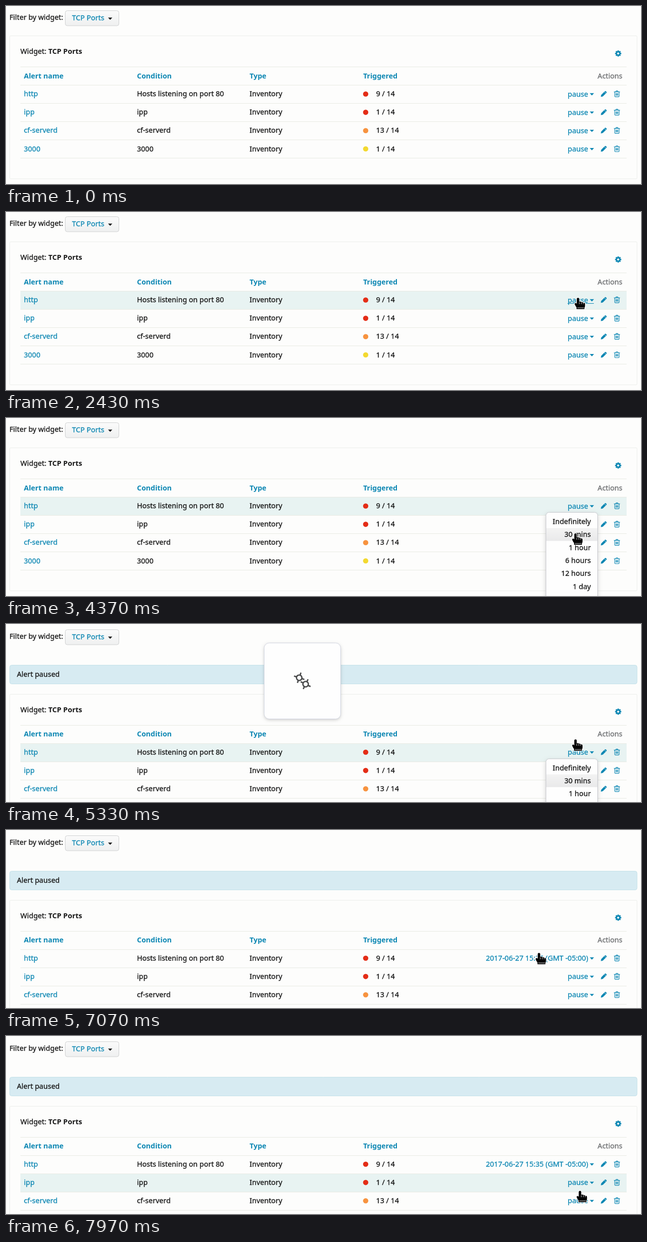
An HTML page with a canvas for the animation above (8 s loop, 1280x361 px).

```html
<!DOCTYPE html>
<html lang="en">
<head>
<meta charset="utf-8">
<title>Alert widget</title>
<style>
html, body { margin: 0; width: 100%; height: 100%; overflow: hidden; background: #fdfdfc; }
canvas { display: block; width: 1280px; height: 361px; }
</style>
</head>
<body>
<canvas id="stage" width="1280" height="361"></canvas>
<script>
const ctx = document.getElementById('stage').getContext('2d');
const LOOP = 8000;
const FONT = '"Noto Sans", "Open Sans", sans-serif';
const PAGE = '#fdfdfc', LINK = '#0d87b3', INK = '#161616', LINE = '#e8eae3';
const ROW_H = 37.1;

const ROWS = [
  ['http', 'Hosts listening on port 80', '9 / 14', '#e42d17'],
  ['ipp', 'ipp', '1 / 14', '#e42d17'],
  ['cf-serverd', 'cf-serverd', '13 / 14', '#f7933f'],
  ['3000', '3000', '1 / 14', '#f3d930']
];
const DELAYS = ['Indefinitely', '30 mins', '1 hour', '6 hours', '12 hours', '1 day'];

// Times of the hard state changes, in ms
const T = {
  rowIn: 2060, linkIn: 2150, menu: 2700, linkOut: 2950, load: 4970,
  paused: 5130, leave: 5860, reload: 6950, dateIn: 7130, dateOut: 7620, nextRow: 7810
};

// Pointer tip: time, x, y
const PATH = [
  [1640, 1120, -30], [2200, 1153, 174], [2800, 1153, 174], [3300, 1149, 248],
  [3700, 1148, 321], [3900, 1148, 321], [4130, 1148, 261], [4340, 1148, 234],
  [5800, 1148, 234], [6000, 1138, 233], [6750, 1138, 233], [7300, 1036, 259],
  [7500, 1035, 264], [7730, 1032, 311], [7970, 1157, 314]
];

const HAND = new Path2D('M-2.5 2.5Q-2.5 0 0 0Q2.5 0 2.5 2.5V8Q4.8 6.9 6.8 8.6Q9.2 7.9 10.8 10' +
  'Q14.2 9.6 14.2 13V16.5Q14.2 18.5 13 20V23H-3V19.5Q-5 17 -6.4 13.8Q-7.6 11.2 -5 10.4Q-3.5 10.2 -2.5 12Z');
const PENCIL = new Path2D('M-6 6L-5.2 2L2 -5.2Q3.2 -6.3 4.4 -5.2L5.4 -4.2Q6.3 -3 5.3 -2L-2 5.2Z');
const TRASH = new Path2D('M-6 -4H6M-2.3 -4.2L-1.5 -6H1.5L2.3 -4.2' +
  'M-4.4 -4V4.6Q-4.4 6 -3 6H3Q4.4 6 4.4 4.6V-4M-1.9 -1.4V3.6M0 -1.4V3.6M1.9 -1.4V3.6');

const within = (t, a, b) => t >= a && t < b;

// Regular text gets a hairline outline for a medium weight
function text(str, x, y, { color = INK, weight = 400, size = 14.5, align = 'left' } = {}) {
  ctx.font = `${weight} ${size}px ${FONT}`;
  ctx.textAlign = align;
  ctx.fillStyle = ctx.strokeStyle = color;
  ctx.fillText(str, x, y);
  if (weight === 400) {
    ctx.lineWidth = 0.3;
    ctx.strokeText(str, x, y);
  }
  return ctx.measureText(str).width;
}

function rect(x, y, w, h, color) {
  ctx.fillStyle = color;
  ctx.fillRect(x, y, w, h);
}

function box(x, y, w, h, r, fill, stroke, shadow) {
  ctx.save();
  ctx.beginPath();
  ctx.roundRect(x, y, w, h, r);
  if (shadow) {
    ctx.shadowColor = 'rgba(0,0,0,.2)';
    ctx.shadowBlur = shadow;
    ctx.shadowOffsetY = shadow / 3;
  }
  ctx.fillStyle = fill;
  ctx.fill();
  ctx.shadowColor = 'transparent';
  ctx.strokeStyle = stroke;
  ctx.lineWidth = 1;
  ctx.stroke();
  ctx.restore();
}

function at(x, y, draw) {
  ctx.save();
  ctx.translate(x, y);
  draw();
  ctx.restore();
}

function disc(x, y, r, color) {
  ctx.beginPath();
  ctx.arc(x, y, r, 0, 7);
  ctx.fillStyle = color;
  ctx.fill();
}

function caret(x, y, color) {
  ctx.beginPath();
  ctx.moveTo(x - 4.3, y - 2);
  ctx.lineTo(x + 4.3, y - 2);
  ctx.lineTo(x, y + 2.6);
  ctx.fillStyle = color;
  ctx.fill();
}

function stripe(y) {
  rect(29, Math.round(y), 1222, 1, LINE);
}

function cog(x, y) {
  at(x, y, () => {
    disc(0, 0, 4.8, LINK);
    for (let i = 0; i < 8; i++) {
      rect(-1.4, -6.3, 2.8, 3, LINK);
      ctx.rotate(Math.PI / 4);
    }
    disc(0, 0, 2.1, PAGE);
  });
}

function filter(dy) {
  text('Filter by widget:', 7, 28 + dy);
  const fill = ctx.createLinearGradient(0, 9 + dy, 0, 40 + dy);
  fill.addColorStop(0, '#fbfbfb');
  fill.addColorStop(1, '#eff0f0');
  box(119.5, 9.5 + dy, 108, 30.5, 4, fill, '#cfd0d1');
  text('TCP Ports', 133, 29 + dy, { color: LINK });
  caret(210, 25.5 + dy, INK);
}

function action(label, y, underlined) {
  const w = text(label, 1173.5, y + 5.5, { color: LINK, align: 'right' });
  caret(1181, y + 0.6, LINK);
  if (underlined) rect(1173 - w, Math.round(y + 7), w + 12, 1, LINK);
  at(1205, y, () => {
    ctx.fillStyle = LINK;
    ctx.fill(PENCIL);
    ctx.strokeStyle = PAGE;
    ctx.lineWidth = 0.8;
    ctx.beginPath();
    ctx.moveTo(1.2, -4.2);
    ctx.lineTo(4.4, -1);
    ctx.stroke();
  });
  at(1231.5, y, () => {
    ctx.strokeStyle = LINK;
    ctx.lineWidth = 1.2;
    ctx.stroke(TRASH);
  });
}

function panel(dy, hover, label, underlined) {
  box(7.5, Math.round(60 + dy) + 0.5, 1264.5, 290, 2, PAGE, '#ebedea');
  const w = text('Widget: ', 29, 97 + dy);
  text('TCP Ports', 29 + w, 97 + dy, { weight: 600 });
  cog(1234, 96.3 + dy);

  stripe(123 + dy);
  const head = { color: LINK, weight: 600, size: 14.4 };
  text('Alert name', 36, 146.7 + dy, head);
  text('Condition', 264, 146.7 + dy, head);
  text('Type', 491, 146.7 + dy, head);
  text('Triggered', 720, 146.7 + dy, head);
  text('Actions', 1242.5, 146.7 + dy, { color: '#6c6e70', align: 'right' });

  ROWS.forEach(([name, condition, count, color], i) => {
    const top = 160 + dy + i * ROW_H;
    const mid = top + 18.2;
    if (i === hover) rect(29, Math.round(top), 1222, 37, '#e8f3f2');
    stripe(top);
    text(name, 36, mid + 5, { color: LINK });
    text(condition, 264, mid + 5);
    text('Inventory', 491, mid + 5);
    disc(725, mid + 0.3, 5.3, color);
    text(count, 746, mid + 5);
    action(i ? 'pause' : label, mid, underlined && i === 0);
  });
  stripe(160 + dy + 4 * ROW_H);
}

function menu(dy, active) {
  const top = Math.round(191 + dy) + 0.5;
  box(1088.5, top, 104, 230, 6, '#fefefe', '#c9cad0', 9);
  DELAYS.forEach((label, i) => {
    const mid = 210 + dy + i * 26.3;
    if (i === active) {
      const fill = ctx.createLinearGradient(0, mid - 13, 0, mid + 13);
      fill.addColorStop(0, '#f3f3f3');
      fill.addColorStop(1, '#e9e9ea');
      rect(1089, mid - 13, 103, 26, fill);
    }
    text(label, 1179, mid + 5, { align: 'right' });
  });
}

function wheel(x, y, deg) {
  at(x, y, () => {
    ctx.rotate(deg * Math.PI / 180);
    ctx.strokeStyle = '#4b4c4d';
    ctx.lineWidth = 2.7;
    ctx.beginPath();
    ctx.arc(0, 0, 5.5, 0, 7);
    ctx.stroke();
    for (let i = 0; i < 4; i++) {
      rect(-1.4, -11, 2.8, 5, '#4b4c4d');
      ctx.rotate(Math.PI / 2);
    }
  });
}

function loader(t) {
  box(520.5, 38.5, 154, 154, 10, '#fefefe', '#d3d6e2', 6);
  const turn = 45 + (t - 6300) * 0.12;
  wheel(591, 109, turn);
  wheel(604, 122, 45 - turn);
}

function pointer(t) {
  const i = PATH.findIndex(p => p[0] > t);
  if (i < 0) return PATH[PATH.length - 1].slice(1);
  if (i === 0) return PATH[0].slice(1);
  const [t0, x0, y0] = PATH[i - 1], [t1, x1, y1] = PATH[i];
  const u = (t - t0) / (t1 - t0), e = u * u * (3 - 2 * u);
  return [x0 + (x1 - x0) * e, y0 + (y1 - y0) * e];
}

function hand(x, y) {
  at(x, y, () => {
    ctx.lineJoin = 'round';
    ctx.strokeStyle = '#fff';
    ctx.lineWidth = 2.2;
    ctx.stroke(HAND);
    ctx.fillStyle = '#050505';
    ctx.fill(HAND);
    ctx.lineWidth = 0.8;
    ctx.beginPath();
    for (const fx of [2.7, 6.8, 10.6]) {
      ctx.moveTo(fx, 9);
      ctx.lineTo(fx, 13);
    }
    ctx.moveTo(-1.5, 20.4);
    ctx.lineTo(12, 20.4);
    ctx.stroke();
  });
}

function hoveredRow(t) {
  if (within(t, T.rowIn, T.leave) || within(t, T.dateIn, T.nextRow)) return 0;
  return t >= T.nextRow ? 1 : -1;
}

function render(t) {
  const paused = t >= T.paused;
  const dy = paused ? 81.5 : 0;
  const [x, y] = pointer(t);

  rect(0, 0, 1280, 361, PAGE);
  filter(paused ? 2 : 0);
  if (paused) {
    box(7.5, 83.5, 1264.5, 38, 4, '#d7ebf2', '#c3e1e9');
    text('Alert paused', 22, 107);
  }
  const label = t < T.reload ? 'pause' : '2017-06-27 15:35 (GMT -05:00)';
  const underlined = within(t, T.linkIn, T.linkOut) || within(t, T.dateIn, T.dateOut);
  panel(dy, hoveredRow(t), label, underlined);

  if (within(t, T.menu, T.reload)) {
    const active = t < T.load ? Math.floor((y - 197) / 26.3) : t < T.leave ? 1 : -1;
    menu(dy, active);
  }
  if (within(t, T.load, T.reload)) loader(t);
  if (t >= PATH[0][0]) hand(x, y);
}

const start = performance.now();
function tick() {
  render((performance.now() - start) % LOOP);
  requestAnimationFrame(tick);
}
tick();
</script>
</body>
</html>
```
